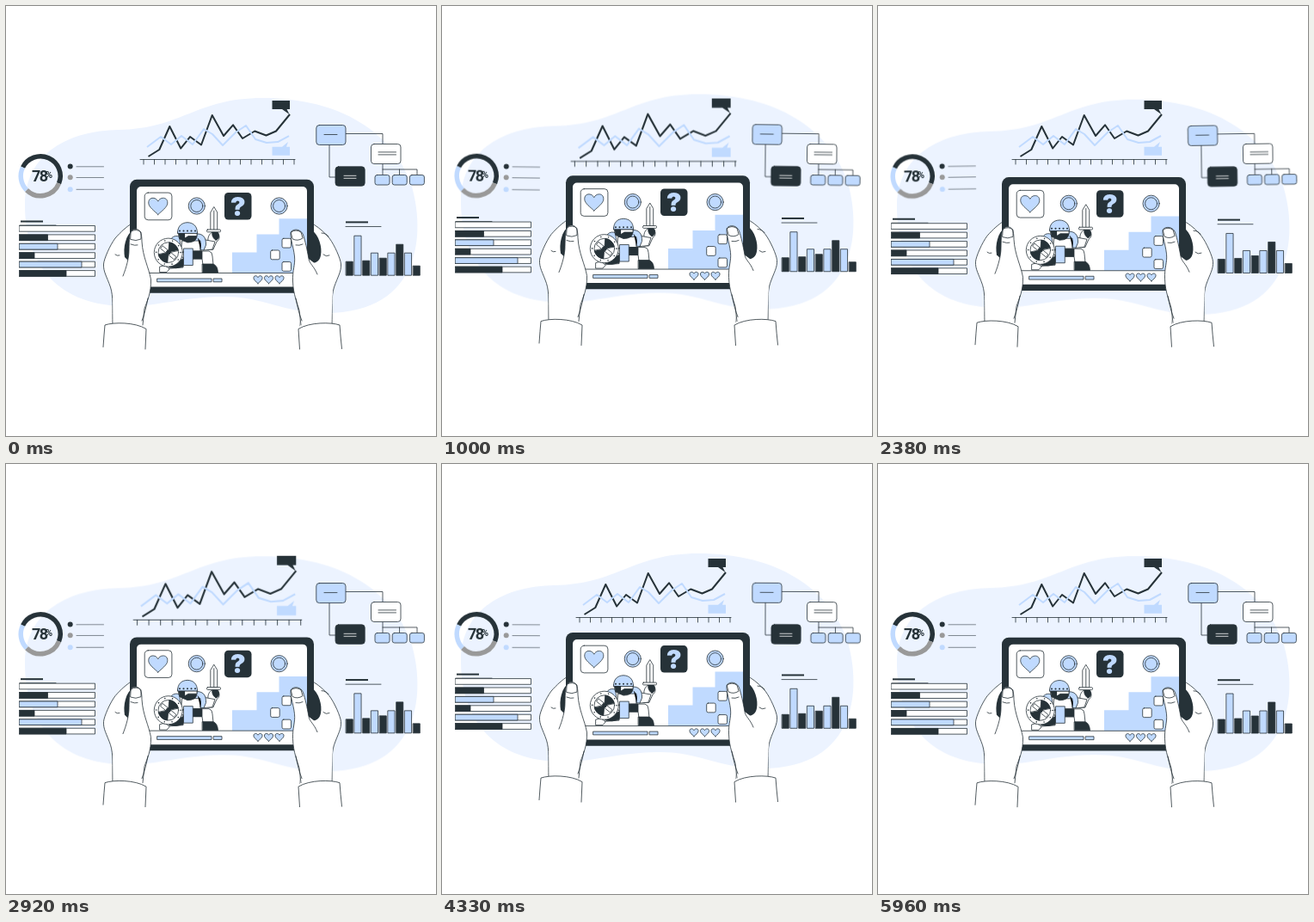
An HTML page that plays this animation: 500x500 px, repeating every 6000 ms.

```html
<!DOCTYPE html>
<html lang="en">
<head>
<meta charset="utf-8">
<title>Game analytics</title>
<style>
  html, body { margin: 0; width: 100%; height: 100%; overflow: hidden; background: #fff; }
  svg { display: block; width: 100vw; height: 100vh; }
  .dark { fill: #263238; }
  .blue { fill: #c0daff; }
  .white { fill: #fff; }
  .ink { stroke: #263238; stroke-width: .8; stroke-linejoin: round; stroke-linecap: round; }
  .none { fill: none; }
  .thick { stroke-width: 2; stroke-linecap: butt; }
  .paper { stroke: #fff; }
  #graph { transform-origin: 246px 147px; }
  #donut { transform-origin: 64px 197px; }
  #flow { transform-origin: 423.5px 173px; }
  .pct { font: 700 18px Roboto, sans-serif; font-stretch: condensed; letter-spacing: -1.6px; }
  .sign { font: 700 11px Roboto, sans-serif; font-stretch: condensed; }
  .quest { font: 900 30px Inter, sans-serif; text-anchor: middle; }
</style>
</head>
<body>
<svg viewBox="0 0 500 500">
  <defs>
    <path id="heart" d="M0 10C-4 6-11.500 1-11.500-4C-11.500-8.500-9-10-6-10C-3-10-1-8 0-6C1-8 3-10 6-10C9-10 11.500-8.500 11.500-4C11.500 1 4 6 0 10Z"/>
    <g id="coin" class="ink blue"><circle r="9.600"/><circle r="7"/></g>
    <rect id="crate" class="ink white" width="10.500" height="10.800" rx="1.800"/>
  </defs>

  <path id="blob" fill="#ecf3ff" d="M22 232C22 170 75 145 130 144C205 143 220 107 298 107C390 107 450 148 471 207C488 262 484 357 372 357C320 357 300 337 250 338C200 339 180 349 140 349C62 349 22 302 22 232Z"/>

  <g id="graph">
    <path id="axis" class="ink none"/>
    <polyline class="ink none thick" points="165.500,175 178.300,167 190.300,140 203.200,165.500 214,152 227,161.500 239.700,127 253,151 264,138.300 275,154 289.200,145.500 302.500,150.500 314,145.500 330,126"/>
    <polyline fill="none" stroke="#c0daff" stroke-width="2" stroke-linejoin="round" points="164,164 180,152 192,161 204,151 217,161 230,143 240,149 252,162 267,147 279,139 290,155 303,159 316,158 329,151"/>
    <path class="dark" d="M309.500 110H330V120H326.500L329.500 126L321 120H309.500Z"/>
    <path class="blue" d="M309.500 163.700H321L328 158L326 163.700H330V173.700H309.500Z"/>
  </g>

  <g id="donut">
    <g id="ring" fill="none" stroke-width="5.500"></g>
    <text class="pct dark" x="30" y="203.800">78</text>
    <text class="sign dark" x="46" y="199.500">%</text>
    <circle class="dark" cx="74.700" cy="186.500" r="3"/>
    <circle fill="#999" cx="74.700" cy="199.200" r="3"/>
    <circle class="blue" cx="74.700" cy="213.200" r="3"/>
    <path class="ink" stroke-opacity=".7" d="M82 186.800H113.500M82 199.500H113.500M82 213.300H113.500"/>
  </g>

  <g id="flow">
    <path class="ink none" d="M395 148.500H438V160M376 161V199H383M438 183V196M438 190H478V196M457.500 190V196"/>
    <g class="ink">
      <rect class="blue" x="360.800" y="138.500" width="34.200" height="23" rx="3.500"/>
      <rect class="white" x="424.500" y="160.500" width="34.500" height="23" rx="3.500"/>
      <rect class="dark" x="383" y="186.800" width="34.200" height="22.500" rx="3.500"/>
      <rect class="blue" x="429" y="196.500" width="17" height="11.500" rx="2.500"/>
      <rect class="blue" x="449.200" y="196.500" width="17" height="11.500" rx="2.500"/>
      <rect class="blue" x="469.400" y="196.500" width="17" height="11.500" rx="2.500"/>
      <path d="M370 149.500H385M433 169.900H453.500M433 172.900H453.500"/>
      <path class="paper" d="M393 197.300H407M393 200.300H407"/>
    </g>
  </g>

  <g id="stage">
    <g id="levels">
      <path class="ink thick" d="M17 250.500H43"/>
      <path class="ink" d="M16 255H58"/>
    </g>
    <g id="columns">
      <path class="ink thick" d="M395 251.400H421"/>
      <path class="ink" d="M395 256.500H436"/>
    </g>

    <!-- hands behind the tablet -->
    <path class="ink white" d="M124 372C123.500 350 125 338 121.500 327C117 314 113 309 113.500 300C114 294 121 278 127 270C134 262 140 257 146 253L160 330L160 372"/>
    <path class="ink white" d="M379 372C379.500 350 378 338 381.500 327C386 314 390 309 389.500 300C389 294 382 278 376 270C369 262 363 257 356 253L342 330L342 372"/>
    <path class="ink none" d="M127 289Q129 291 132 290M376 290Q372 292 369 289M367 264Q372 264 375 268"/>
    <path class="dark" d="M148 260C139 266 136 281 138 292L142 296L148 300Z"/>
    <path class="dark" d="M355 260C364 266 368 281 366 290C365 296 361 299 355 299Z"/>

    <rect class="dark" x="144" y="201.800" width="214" height="131.900" rx="8"/>
    <rect class="white" x="152" y="210" width="198" height="116.500" rx="5"/>

    <!-- game screen -->
    <path class="blue" d="M263 310.500V286.500H291.500V265.500H317.500V247.300H350V310.500Z"/>
    <path class="ink" d="M152 310.500H350"/>
    <use href="#crate" x="307.700" y="284"/>
    <use href="#crate" x="321" y="270.300"/>
    <use href="#crate" x="321" y="297.500"/>
    <rect class="ink white" x="161.200" y="217.100" width="31.700" height="31.700" rx="4"/>
    <use href="#heart" class="ink blue" transform="translate(176.800 232.900) scale(.96)"/>
    <use href="#coin" x="221.800" y="232.500"/>
    <use href="#coin" x="317.600" y="232.500"/>
    <rect class="dark" x="254" y="217" width="31.500" height="31.500" rx="4.500"/>
    <text class="quest blue" x="269.700" y="243.800">?</text>
    <rect class="ink blue" x="176" y="317" width="63" height="3.800"/>
    <rect class="ink blue" x="241.500" y="317" width="9.500" height="3.800"/>
    <g id="lives" class="ink blue"></g>

    <g id="knight" class="ink">
      <path class="white" d="M237.800 260V240L241.800 233.500L245.700 240V260Z"/>
      <path d="M241.800 238V260"/>
      <path class="white" d="M234 283L235 270C236 264 241 261 245 264C249 267 249 271 245 274L241 283Z"/>
      <path class="dark" d="M240 263H246C249 266 248 271 244 272.500C241 270 239 267 240 263Z"/>
      <rect class="white" x="233.500" y="260" width="16" height="2.800" rx="1"/>
      <path class="white" d="M232 272L243 274L240 283L230 284Z"/>
      <path class="blue" d="M220 265C229 264 233 269 232.500 278L230 284L220 283Z"/>
      <path class="blue" d="M201 268C196 266 192 269 189 275L204 285Z"/>
      <path class="white" d="M205 273H226V286H204Z"/>
      <path d="M223 270Q228 275 226 283"/>
      <path class="white" d="M216 285H236Q240 286 240 291L241 301H229L228 294H216Z"/>
      <path class="dark" d="M217 285H228V294H217Z"/>
      <path class="dark" d="M228.500 300H241Q246 302 246.500 310H228.500Z"/>
      <path class="white" d="M186 296L206 292V304L180 306Z"/>
      <path class="dark" d="M190 300L206 294V303Q198 306 190 304Z"/>
      <path class="white" d="M179 303Q186 300 190 306L187 309.500H179Z"/>
      <rect class="blue" x="206.800" y="282" width="10.500" height="19.500"/>
      <path class="dark" d="M200 262H222V268Q221 275 211 275L202 271Z"/>
      <path class="white" d="M208 264H222V267.500H212L208 270Z"/>
      <path class="blue" d="M199.500 264C199.500 256 204 252 211 251.700C218 252 222.500 256 222.500 264Z"/>
      <path stroke-width="2" stroke-dasharray="0 4.500" d="M202 261.600H221"/>
      <g transform="translate(188.800 286.600)">
        <circle class="white" r="16.500"/>
        <circle class="white" r="11.800"/>
        <path class="dark" d="M0 0L1 -11.800A11.800 11.800 0 0 1 11.500 -2.500ZM0 0L-1 11.800A11.800 11.800 0 0 1 -11.500 2.500Z"/>
        <path class="white" d="M-9 -5L-7 -8L9 5L7 8Z"/>
        <circle class="dark" r="2.500"/>
        <circle class="none" r="14.200" stroke-width="1.600" stroke-dasharray="0 8.920"/>
      </g>
    </g>

    <!-- thumbs and sleeves -->
    <path class="white" d="M125 372L124 330L136 314L158 285L168.500 318L160 352L162 373Z"/>
    <path class="ink white" d="M136 314C140 304 143 293 143 284C143.500 272 142.500 261 149 259.700C156 258.500 158 264 158 274C159 292 166 304 168.500 318C169 334 164 343 161 352L159 371"/>
    <path class="ink none" d="M145.500 262Q152 258.500 157 263V271Q151 274 145 271.500ZM145 277Q150 279 153 278M165 340Q162 356 158 366"/>
    <path class="white" d="M378 372L380 330L360 300L340 285L333.500 318L340 352L342 373Z"/>
    <path class="ink white" d="M362 312C358 302 353 300 352 294C350 282 348 274 345.500 266C343 259.500 335 258.500 331.500 262.500C329.500 268 334 278 335.500 291C336.500 302 333 306 333.500 320C334 336 339 346 341 354L343 371"/>
    <path class="ink none" d="M331.500 263Q337 259 343 263L345 270Q339 274 333.500 271ZM337 278Q341 279 345 277M337 340Q340 356 344 366"/>
    <path class="white" d="M115 371C125 367.500 150 367.500 163 375.500L162 400H113Z"/>
    <path class="ink none" d="M113 396.500Q114 382 115 371C125 367.500 150 367.500 163 375.500L162 399"/>
    <path class="white" d="M340 375.500C353 367.500 378 367.500 388 371L390 400H341.500Z"/>
    <path class="ink none" d="M341.500 399L340 375.500C353 367.500 378 367.500 388 371Q389 385 390.500 398.500"/>
  </g>
</svg>

<script>
  const $ = id => document.getElementById(id);

  function add(parent, tag, attrs) {
    const el = document.createElementNS("http://www.w3.org/2000/svg", tag);
    for (const key in attrs) el.setAttribute(key, attrs[key]);
    return $(parent).appendChild(el);
  }

  const box = (parent, cls, x, y, width, height) =>
    add(parent, "rect", { class: "ink " + cls, x, y, width, height });

  // Axis with 15 ticks
  let axis = "M156 178.500H336";
  for (let i = 0; i < 15; i++) axis += `M${160 + i * 12.5} 178.500V184`;
  $("axis").setAttribute("d", axis);

  // Ring segments: start angle, end angle, colour
  [[206, 382, "#263238"], [22, 135, "#999"], [135, 206, "#c0daff"]].forEach(([from, to, stroke]) => {
    const at = deg => {
      const a = deg * Math.PI / 180;
      return `${40.2 + 23 * Math.cos(a)} ${197.7 + 23 * Math.sin(a)}`;
    };
    add("ring", "path", { stroke, d: `M${at(from)}A23 23 0 0 1 ${at(to)}` });
  });

  [0, 33, 44.5, 17.5, 72.5, 54.5].forEach((fill, i) => {
    const y = 255.5 + i * 10.42;
    box("levels", "white", 15.5, y, 88, 6.7);
    if (fill) box("levels", i % 2 ? "dark" : "blue", 15.5, y, fill, 6.7);
  });

  [16, 46, 17, 26, 20, 26, 36, 26, 11].forEach((h, i) =>
    box("columns", i % 2 ? "blue" : "dark", 395.5 + i * 9.75, 313.2 - h, 7.8, h));

  [293, 305.5, 318].forEach(x =>
    add("lives", "use", { href: "#heart", transform: `translate(${x} 318.200) scale(.44)`, "stroke-width": 1.8 }));

  // Motion tables: [offset, value]
  function move(id, fn, duration, steps) {
    $(id).animate(
      steps.map(([offset, v]) => ({ offset, transform: `${fn}(${v})` })),
      { duration, iterations: Infinity, easing: "linear" }
    );
  }

  const wind = [[0, "0deg"], [.25, "1deg"], [.75, "-1deg"], [1, "0deg"]];
  move("stage", "translateY", 3000, [[0, "0px"], [.5, "-6.67px"], [1, "0px"]]);
  move("blob", "translateY", 3000, [[0, "0px"], [1 / 3, "-4.45px"], [5 / 6, "2.22px"], [1, "0px"]]);
  move("donut", "rotate", 3000, wind);
  move("flow", "rotate", 3000, wind);
  move("graph", "scale", 6000, [[0, 1], [.1, 1.1], [.3, 1], [.4, 1], [.5, 1.1], [.6, 1], [1, 1]]);
</script>
</body>
</html>
```
